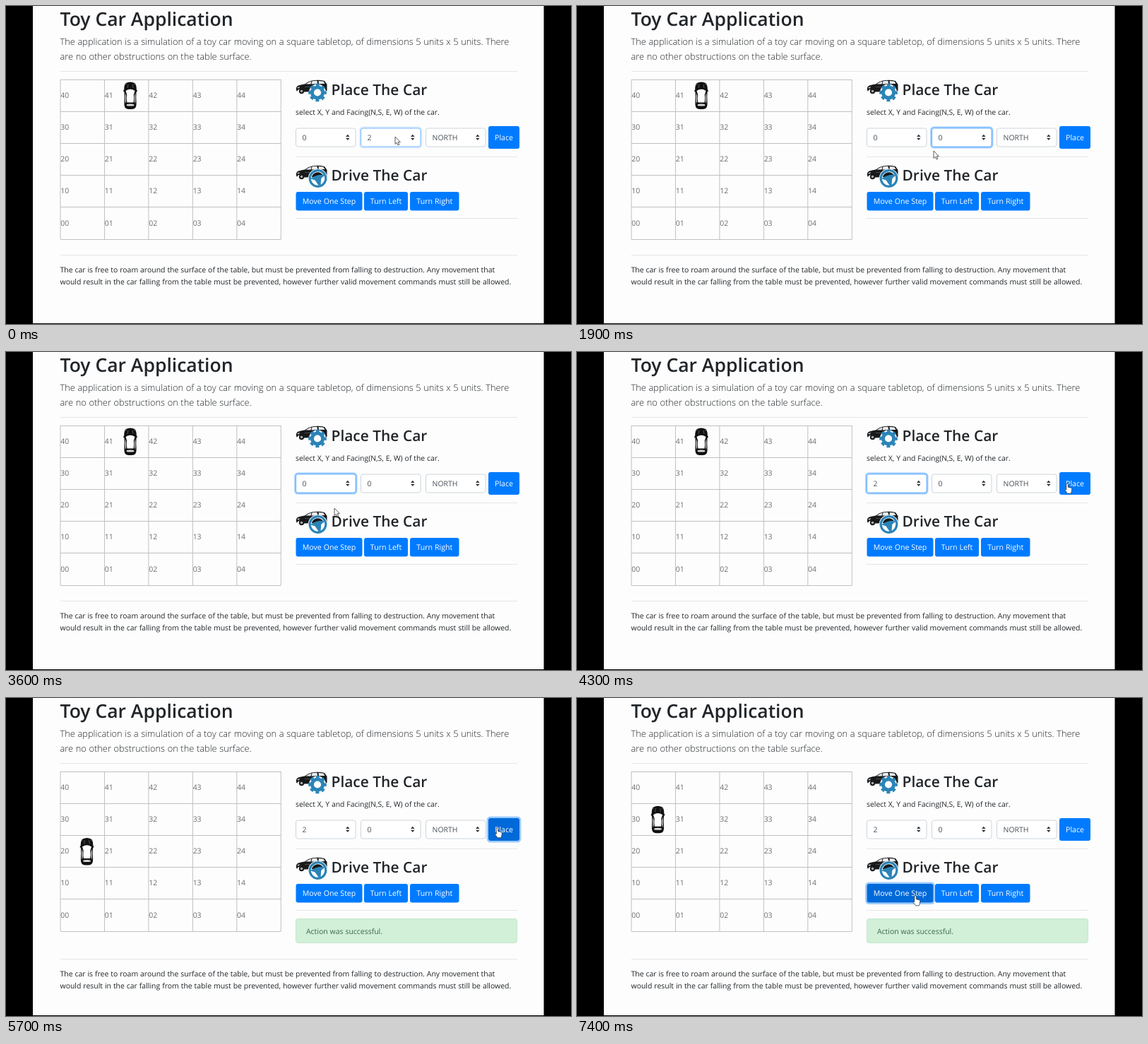
Recreate the animation shown at these times as an HTML page. Size 800x450 px, loop 8 s.

```html
<!DOCTYPE html>
<html lang="en">
<head>
<meta charset="utf-8">
<title>Toy Car Application</title>
<style>
html, body { margin: 0; width: 100%; height: 100%; overflow: hidden; background: #000; }
svg { display: block; }
text { font: 10.46px 'Open Sans', sans-serif; word-spacing: .02em; fill: #212529; text-rendering: geometricPrecision; }
.h1 { font-size: 26.5px; font-weight: 600; word-spacing: 0; }
.h2 { font-size: 20.95px; font-weight: 600; word-spacing: 0; }
.lead { font-size: 12.86px; font-weight: 300; }
.hint { font-size: 10.4px; }
.cell { fill: #6c6c6c; }
.field { fill: #495057; }
.btn { font-size: 10.6px; fill: #fff; text-anchor: middle; }
.ok { fill: #3b6a48; }
</style>
</head>
<body>
<svg id="stage" width="800" height="450" viewBox="0 0 800 450">
  <defs>
    <g id="sideCar">
      <path d="M411 119q-1-5 3-6.500q5-1.500 9-2q5-4 10-5q10-1.500 18 .5l3.500 5v9l-30 1.500h-3a5 5 0 0 0-9.500-.5z" fill="#17191b"/>
      <path d="M424.500 110.500q4-3 8-4l-1 4zM433.500 106.300q4-.6 7-.4l.5 4.400-8.500.2zM442.500 106q4 0 7 .8l2 3.200-8.500.2z" fill="#e9ebec"/>
      <path d="M412 115.500l4-1.200-1.500 2.200zM423 114.500h16" fill="#fff" stroke="#777" stroke-width=".5"/>
      <circle cx="418.500" cy="120.500" r="3.700" fill="#17191b"/>
      <circle cx="418.500" cy="120.500" r="1.800" fill="#aaa"/>
    </g>
    <g id="topCar">
      <path d="M-6 2Q0-1 6 2Q8.800 4 8.800 11L10 13.500 8.600 14.500Q7.800 22 8.600 30Q9 37 5 38.500Q0 39.500-5 38.500Q-9 37-8.600 30Q-7.800 22-8.600 14.500L-10 13.500-8.800 11Q-8.800 4-6 2Z" fill="#111"/>
      <path d="M-6.500 13Q0 8.500 6.500 13L4.800 18.500Q5.600 24 4.600 29.500H-4.600Q-5.600 24-4.800 18.500Z" fill="#fdfdfd"/>
      <path d="M-7.200 16L-5.900 20V28L-7.200 31ZM7.200 16L5.900 20V28L7.200 31ZM-4.800 32Q0 31 4.800 32L5.500 34Q0 35-5.500 34Z" fill="#d8d8d8"/>
      <path d="M-7 5l2-2M7 5l-2-2M-4 9l1-5M4 9l-1-5" stroke="#888" stroke-width=".6"/>
    </g>
  </defs>
  <rect x="38" width="723.500" height="449" fill="#fdfdfd"/>
  <g id="page"></g>
  <g id="alert">
    <rect x="410.500" y="312.500" width="313" height="34" rx="3" fill="#d2efd8" stroke="#c3e6cb"/>
    <text class="ok" x="425" y="334">Action was successful.</text>
  </g>
  <g id="foot">
    <path d="M77 352.500H724" stroke="#e5e5e5"/>
    <text x="76.500" y="377">The car is free to roam around the surface of the table, but must be prevented from falling to destruction. Any movement that</text>
    <text x="76.500" y="394">would result in the car falling from the table must be prevented, however further valid movement commands must still be allowed.</text>
  </g>
  <use id="car" href="#topCar"/>
  <g id="cursor" stroke="#333" stroke-width=".8" stroke-linejoin="round" fill="#fff">
    <path id="arrow" d="M0 0V10.500L2.400 8.300 4 12 5.800 11.200 4.200 7.700H7.300Z"/>
    <path id="hand" d="M3 .5c.9 0 1.300.6 1.300 1.300V5.700l4.400 1c.8.2 1.200.7 1.100 1.500l-.5 4-1 2.600H3.600L.2 10.400c-.5-.8.6-1.600 1.300-1l.3.200V1.800C1.800 1.100 2.200.5 3 .5Z"/>
  </g>
</svg>
<script>
const $ = id => document.getElementById(id);
const set = (id, name, value) => $(id).setAttribute(name, value);
const show = (id, on) => set(id, 'opacity', +on);
const label = (x, y, s, cls = '', id = '') => `<text id="${id}" class="${cls}" x="${x}" y="${y}">${s}</text>`;
const line = d => `<path d="${d}" fill="none" stroke="#e5e5e5"/>`;
const glow = (id, x, y, w, h) =>
  `<rect id="${id}Glow" x="${x - 1.2}" y="${y - 1.2}" width="${w + 2.4}" height="${h + 2.4}" rx="4" fill="none" stroke="#007bff" stroke-opacity=".38" stroke-width="2.400"/>`;

function select(id, x, value) {
  return `<rect id="${id}Box" x="${x}" y="173" width="84.500" height="26" rx="3" fill="#fff" stroke="#ced4da"/>`
    + glow(id, x, 173, 84.5, 26) + label(x + 9, 189.8, value, 'field', id + 'Text')
    + `<path d="M${x + 70.5} 185l2.800-3.300 2.800 3.300zm0 1.700l2.800 3.300 2.800-3.300z" fill="#343a40"/>`;
}

function button(id, x, y, w, h, s) {
  return glow(id, x, y, w, h)
    + `<rect id="${id}Box" x="${x}" y="${y}" width="${w}" height="${h}" rx="3" fill="#007bff"/>`
    + label(x + w / 2, y + h / 2 + 3.9, s, 'btn');
}

function grid() {
  const colX = c => 77 + c * 62.45, rowY = r => 104 + r * 45.2;
  let lines = '', cells = '';
  for (let i = 0; i < 6; i++) {
    lines += `M${colX(i)} 104V330M77 ${Math.floor(rowY(i)) + .5}H389.500`;
    for (let c = 0; i < 5 && c < 5; c++) cells += label(colX(c) + .3, rowY(i) + 25.8, `${4 - i}${c}`, 'cell');
  }
  return `<path d="${lines}" stroke="#c0c0c0"/>` + cells;
}

const gear = `<g fill="none" stroke="#2b84b8">
  <circle cx="441" cy="122.500" r="11" fill="#fdfdfd" stroke="#fdfdfd" stroke-width="2"/>
  <circle cx="441" cy="122.500" r="7.600" stroke-width="5"/>
  <circle cx="441" cy="122.500" r="11" stroke-width="3.600" stroke-dasharray="4.900 3.739" stroke-dashoffset="2.450"/></g>`;
const wheel = `<g fill="none" stroke="#2b84b8" transform="rotate(-15 441.500 244)">
  <circle cx="441.500" cy="244" r="11.300" stroke="#fdfdfd" stroke-width="5"/>
  <circle cx="441.500" cy="244" r="11.300" stroke-width="3.200"/>
  <path d="M431 241.500Q441.500 237.500 452 241.500L446 245.500 443 254h-3l-3-8.500z" fill="#2b84b8" stroke="none"/></g>`;

$('page').innerHTML = label(76.5, 28, 'Toy Car Application', 'h1')
  + label(76.5, 55.3, 'The application is a simulation of a toy car moving on a square tabletop, of dimensions 5 units x 5 units. There', 'lead')
  + label(76.5, 76.3, 'are no other obstructions on the table surface.', 'lead')
  + line('M77 92.500H724M410 213.500H724M410 300.500H724') + grid()
  + '<use href="#sideCar"/>' + gear + label(460.5, 125.7, 'Place The Car', 'h2')
  + label(410, 154.3, 'select X, Y and Facing(N,S, E, W) of the car.', 'hint')
  + select('row', 410.5, 0) + select('col', 502.5, 2) + select('face', 594.5, 'NORTH')
  + button('place', 683, 170, 44, 32, 'Place')
  + '<use href="#sideCar" y="121"/>' + wheel + label(460.5, 246.8, 'Drive The Car', 'h2')
  + button('move', 410.5, 263, 94, 26.5, 'Move One Step')
  + button('left', 507, 263, 62, 26.5, 'Turn Left')
  + button('right', 572, 263, 69.5, 26.5, 'Turn Right');

// time, x, y of the pointer tip
const path = [
  [0, 551, 185], [200, 551, 186], [400, 540, 217], [1200, 540, 217], [1400, 536, 216],
  [1500, 536, 216], [1900, 505, 205], [2000, 505, 205], [2400, 470, 191], [2700, 470, 191],
  [2800, 471, 199], [3400, 471, 199], [3700, 462, 232], [4000, 470, 230], [4300, 691, 185.5],
  [4500, 693, 183], [5600, 693, 183], [5700, 692.5, 183], [5900, 584, 221], [6100, 520, 262],
  [6200, 496, 273], [6400, 476, 279], [8000, 476, 279]
];

function pointer(t) {
  const i = path.findIndex(p => p[0] > t);
  const [t0, x0, y0] = path[i - 1], [t1, x1, y1] = path[i];
  const k = (t - t0) / (t1 - t0);
  return [x0 + (x1 - x0) * k, y0 + (y1 - y0) * k];
}

function draw(t) {
  const focus = t < 2600 ? 'col' : t < 4700 ? 'row' : t < 7000 ? 'place' : 'move';
  for (const id of ['row', 'col', 'face', 'place', 'move', 'left', 'right'])
    set(id + 'Glow', 'opacity', id === focus ? (t < 100 ? .35 : 1) : 0);
  for (const id of ['row', 'col', 'face'])
    set(id + 'Box', 'stroke', id === focus ? '#80bdff' : '#ced4da');

  $('colText').textContent = t < 1200 ? 2 : 0;
  $('rowText').textContent = t < 3800 ? 0 : 2;
  set('placeBox', 'fill', t >= 4400 && t < 5800 ? '#0069d9' : '#007bff');
  set('moveBox', 'fill', t >= 6200 ? '#0069d9' : '#007bff');

  const placed = t >= 5000;
  show('alert', placed);
  set('foot', 'transform', `translate(0 ${placed ? 17 : 0})`);
  const [carX, carY] = !placed ? [176, 107] : t < 7200 ? [114.5, 197.5] : [114.5, 152.3];
  set('car', 'transform', `translate(${carX} ${carY})`);

  const hand = t >= 4300 && t < 5800 || t >= 6200;
  show('hand', hand);
  show('arrow', !hand);
  show('cursor', t < 6000 || t >= 6200);
  set('cursor', 'transform', `translate(${pointer(t)})`);
}

const start = performance.now();
function tick() {
  const t = (performance.now() - start) % 8000;
  draw(Math.floor(t / 100) * 100);
  requestAnimationFrame(tick);
}
tick();
</script>
</body>
</html>
```
